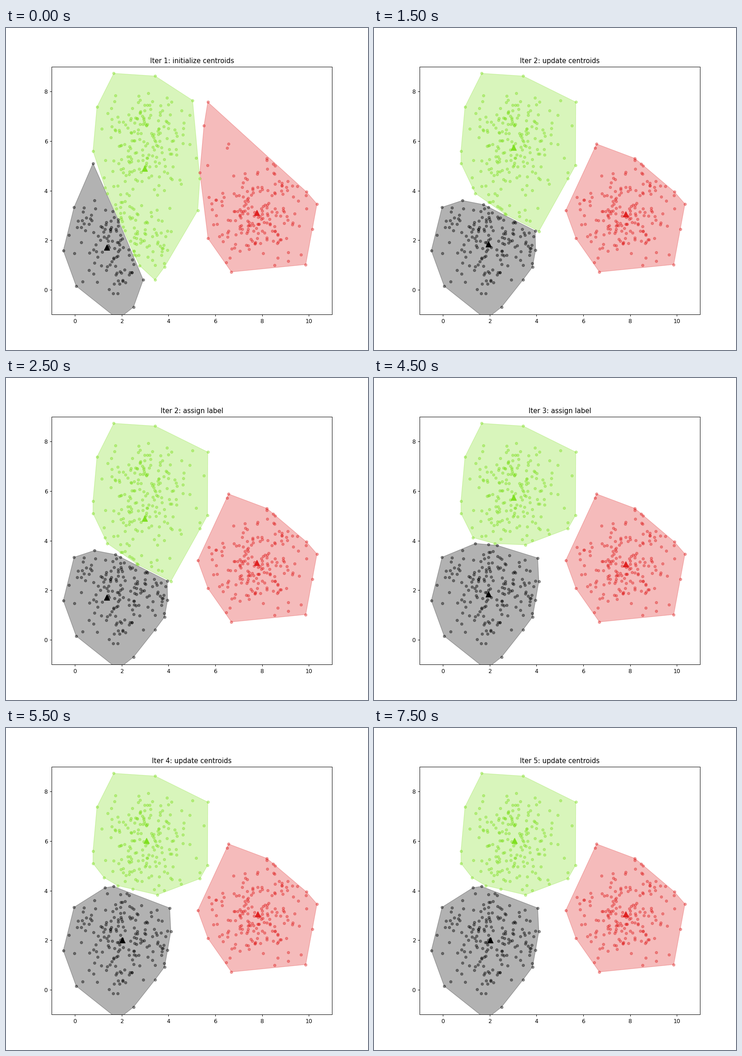
Animation, 794 px wide and 706 px high, one loop 8 s. Source, as a matplotlib script:

```python
import numpy as np
import matplotlib.pyplot as plt
from matplotlib.animation import FuncAnimation

W, H, DPI = 794, 706, 88.25
COLORS = ["#000000", "#7fdf20", "#df2020"]
STEP_MS, FRAMES, ROUNDS = 500, 16, 5

# Each blob: mean, number of inner points, and the corners that enclose them
BLOBS = [
    ((2.02, 2.07), 180,
     [(-0.04, 3.33), (-0.5, 1.58), (0.05, 0.15), (1.84, -1.19), (2.5, -0.7),
      (2.92, 0.4), (3.42, 0.4), (3.83, 0.92), (3.96, 1.6), (4.1, 2.36),
      (4.05, 3.3), (1.83, 4.2), (1.29, 4.12)]),
    ((3.05, 6.0), 180,
     [(0.77, 5.1), (0.77, 5.6), (0.94, 7.38), (1.66, 8.73), (3.43, 8.62),
      (5.03, 7.64), (5.68, 7.57), (5.67, 5.02), (5.34, 4.73), (5.34, 4.48),
      (3.52, 3.83), (2.47, 4.07), (1.24, 4.53)]),
    ((7.8, 3.06), 185,
     [(6.57, 5.88), (8.21, 5.3), (9.9, 3.95), (10.35, 3.46), (10.15, 2.45),
      (9.87, 1.02), (6.69, 0.72), (5.69, 2.07), (5.25, 3.2)]),
]
START = np.array([(1.37, 1.634), (3.06, 2.4), (7.97, 2.83)])


def cross(a, b, p):
    return (b[0] - a[0]) * (p[1] - a[1]) - (b[1] - a[1]) * (p[0] - a[0])


def half_hull(points):
    chain = []
    for p in points:
        while len(chain) > 1 and cross(chain[-2], chain[-1], p) <= 0:
            chain.pop()
        chain.append(p)
    return chain[:-1]


def convex_hull(points):
    ordered = sorted(map(tuple, points))
    return np.array(half_hull(ordered) + half_hull(ordered[::-1]))


def inside(hull, p):
    return all(cross(a, b, p) >= 0 for a, b in zip(hull, np.roll(hull, -1, axis=0)))


def make_blob(rng, mean, count, corners):
    """Normal scatter around the mean; strays are pulled inside the corners."""
    hull = convex_hull(corners)
    offsets = rng.normal(0, 1, (count, 2))
    offsets -= offsets.mean(axis=0)
    for off in offsets:
        while not inside(hull, mean + off):
            off *= 0.75
    return np.vstack([corners, mean + offsets])


def nearest(points, centres):
    gaps = points[:, None, :] - centres[None, :, :]
    return (gaps ** 2).sum(axis=2).argmin(axis=1)


# Run k-means, keeping the centroids and labels of every round
rng = np.random.RandomState(7)
points = np.vstack([make_blob(rng, *blob) for blob in BLOBS])
centres, clusters = [START], []
for _ in range(ROUNDS):
    labels = nearest(points, centres[-1])
    groups = [points[labels == k] for k in range(3)]
    clusters.append(groups)
    centres.append(np.array([g.mean(axis=0) for g in groups]))

fig = plt.figure(figsize=(W / DPI, H / DPI), dpi=DPI)
ax = fig.add_axes([0.126, 0.11, 0.775, 0.77])
ax.set_xlim(-1, 11)
ax.set_ylim(-1, 9)
title = ax.set_title("")

areas, dots, marks = [], [], []
for color in COLORS:
    areas += ax.fill([0, 1, 1], [0, 0, 1], facecolor=color, edgecolor=color,
                     linewidth=1, alpha=0.3)
    dots += ax.plot([], [], "o", color=color, markersize=4.5, alpha=0.4)
    marks += ax.plot([], [], "^", color=color, markersize=9, zorder=3)


def update(frame):
    phase = (frame + 1) // 2
    step = phase // 2 + 1
    assigning = phase % 2 == 1
    if assigning:
        action = "assign label"
    else:
        action = "initialize centroids" if step == 1 else "update centroids"
    title.set_text(f"Iter {step}: {action}")

    shown = centres[step - 1 if assigning else step]
    for k, group in enumerate(clusters[step - 1]):
        areas[k].set_xy(convex_hull(group))
        dots[k].set_data(*group.T)
        marks[k].set_data([shown[k, 0]], [shown[k, 1]])
    return [title, *areas, *dots, *marks]


anim = FuncAnimation(fig, update, frames=FRAMES, interval=STEP_MS,
                     repeat=True, repeat_delay=0, blit=False)
plt.show()
```
